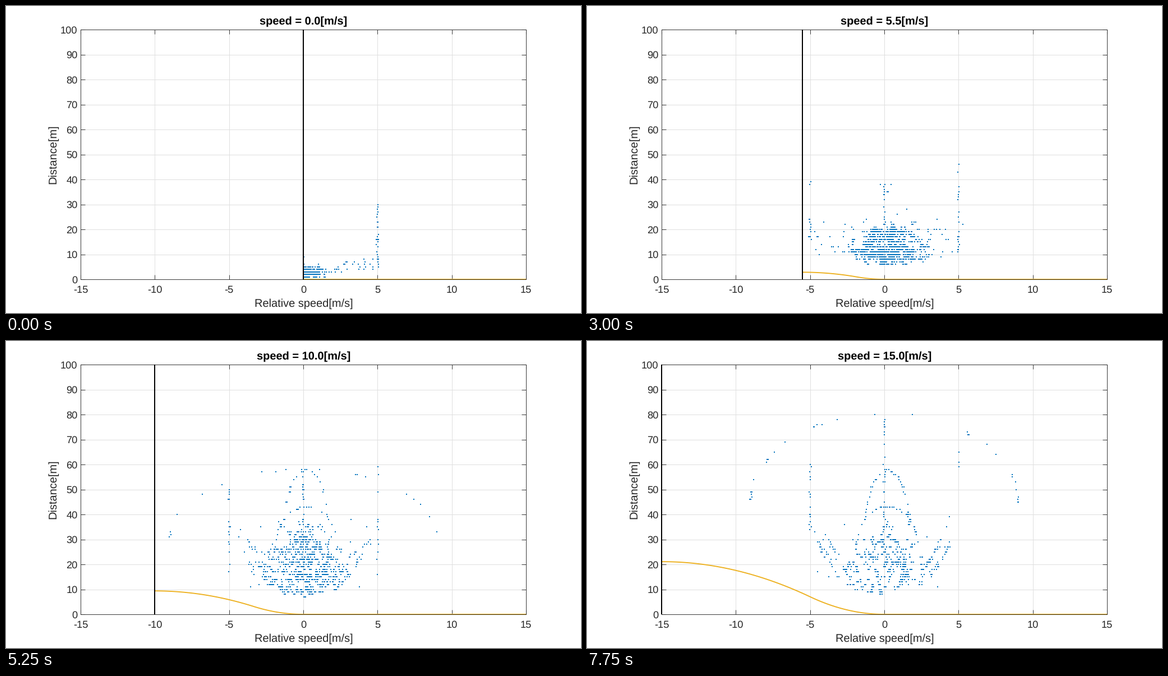
Animation of 1025 by 547 pixels, one loop 8000 ms. Source, as a matplotlib script:

```python
import numpy as np
import matplotlib.pyplot as plt
from matplotlib.animation import FuncAnimation

W, H, DPI = 1025, 547, 100
PX = 72 / DPI
LEFT, RIGHT, TOP, BOTTOM = 133, 927, 42, 487
X_PX = (RIGHT - LEFT) / 30
Y_PX = (BOTTOM - TOP) / 100
STEPS, INTERVAL = 32, 250

BLUE, GOLD, DARK = "#0072bd", "#edb120", "#262626"
plt.rcParams["font.family"] = "Liberation Sans"
plt.rcParams["text.hinting"] = "none"


def core(rng, v, low, high):
    """Egg-shaped cloud made of short chains of dots, hollower at speed."""
    count = int(np.interp(v, [0, 3.5, 8, 15], [420, 1080, 1000, 380])) // 3
    h = rng.beta(1.2, 1.7, count)
    u = np.clip(rng.normal(0, 0.45, count), -1.1, 1.1)
    rim = np.sin(rng.uniform(-np.pi, np.pi, count))
    u = np.where(rng.random(count) < v / 40, rim, u)
    half = (1.6 + min(v, 3.5) / 3) * (0.25 + 0.75 * np.sin(np.pi * h ** 0.6))
    x = 0.2 + u * half
    y = low + h * (high - low)
    dx = rng.normal(0, 0.09, (count, 3)).cumsum(axis=1)
    dy = (rng.random((count, 3)) < 0.35).cumsum(axis=1) - 0.5
    return (x[:, None] + dx).ravel(), (y[:, None] + dy).ravel()


def column(rng, x, low, high, n):
    return x + rng.normal(0, 0.04, n), rng.uniform(low, high, n)


def dome(rng, x, base, half, top, n):
    """Upper half of an ellipse."""
    a = np.pi * rng.random(n)
    return (x + half * np.cos(a) + rng.normal(0, 0.04, n),
            base + (top - base) * np.sin(a))


def wings(rng, start, low, high, n):
    """A pair of trails that lean outwards as they rise."""
    y = rng.uniform(low, high, n)
    side = rng.choice([-1, 1], n)
    return side * (start + 0.09 * (y - low)) + rng.normal(0, 0.1, n), y


def scatter(rng, low, high, n):
    x = rng.uniform(1.2, 4.7, n) * rng.choice([-1, 1], n)
    return x, rng.uniform(low, high, n) + 0.7 * np.abs(x)


def dots(v):
    rng = np.random.default_rng(int(2 * v))
    low = 1 + 8 * (1 - np.exp(-v / 5))
    high = min(5 + 3.1 * v, 36)
    peak = 13 + 4.5 * v
    growth = int(max(v - 4, 0))

    parts = [
        core(rng, v, low, high),
        scatter(rng, low, high, int(75 - 4 * v)),
        column(rng, 0, high, peak, int(8 + v)),
        column(rng, 5, 5 + v, 30 + 3.2 * v, int(30 - 1.8 * v)),
        column(rng, -5, 10 + 3 * max(v - 8, 0), 25 + 2.5 * v, 16),
        dome(rng, 0, 3 * v, min(v, 9), peak, int(3 * growth)),
    ]
    for half, rise in ((1.2, 0.85), (2.1, 1.2), (1.5, 1.6)):
        top = rise * high
        parts.append(dome(rng, 0.2, 0.6 * top, half, top, 4 * growth))
    for start in (2.4, 3.1):
        parts.append(wings(rng, start, 0.4 * high, 0.85 * high, 4 * growth))

    x, y = (np.concatenate(axis) for axis in zip(*parts))
    x, y = np.round(x * X_PX) / X_PX, np.rint(y)
    keep = (x >= -v) & (y >= 1)
    return x[keep], y[keep]


def braking(v):
    """Two joined parabolas from the full braking distance down to zero."""
    x = np.append(np.linspace(-v, 0, 120), 15)
    u = np.clip(-x / max(v, 1e-9), 0, 1)
    shape = np.where(u < 1 / 3, 3 * u ** 2, 1 - 1.5 * (1 - u) ** 2)
    return x, 3 / 32 * v ** 2 * shape


fig = plt.figure(figsize=(W / DPI, H / DPI), dpi=DPI, facecolor="white")
ax = fig.add_axes([LEFT / W, 1 - BOTTOM / H,
                   (RIGHT - LEFT) / W, (BOTTOM - TOP) / H])
ax.set(xlim=(-15, 15), ylim=(0, 100),
       xticks=range(-15, 16, 5), yticks=range(0, 101, 10))
ax.set_axisbelow(True)
ax.grid(color="#dfdfdf", linewidth=PX)
ax.tick_params(direction="in", length=8 * PX, width=0.9 * PX, color=DARK,
               top=True, right=True, labelbottom=False, labelleft=False)
for spine in ax.spines.values():
    spine.set(linewidth=0.9 * PX, color=DARK)


def label(x, y, text, size, ha="center", color=DARK, **kw):
    return fig.text(x / W, 1 - y / H, text, fontsize=size * PX, color=color,
                    ha=ha, va="baseline", rotation_mode="anchor", **kw)


for value in range(-15, 16, 5):
    label(LEFT + (value + 15) * X_PX, 511, str(value), 18.3)
for value in range(0, 101, 10):
    label(127.5, BOTTOM - value * Y_PX + 6.5, str(value), 18.3, ha="right")
label(530.5, 536, "Relative speed[m/s]", 20)
label(89.5, 264, "Distance[m]", 20, rotation=90)
title = label(530.5, 32.5, "", 20, color="black", weight="bold")

cloud, = ax.plot([], [], "s", color=BLUE, markersize=2 * PX,
                 markeredgewidth=0, zorder=2)
curve, = ax.plot([], [], color=GOLD, linewidth=1.9 * PX, zorder=2.2,
                 clip_on=False)
wall, = ax.plot([], [], color="black", linewidth=2 * PX, zorder=2.6,
                solid_capstyle="butt", clip_on=False)


def update(i):
    speed = 0.5 * max(i - 1, 0)
    title.set_text(f"speed = {speed:.1f}[m/s]")
    cloud.set_data(*dots(speed))
    curve.set_data(*braking(speed))
    wall.set_data([-speed, -speed], [0, 100])
    return cloud, curve, wall, title


anim = FuncAnimation(fig, update, frames=STEPS, interval=INTERVAL,
                     repeat=True, repeat_delay=0)
plt.show()
```
